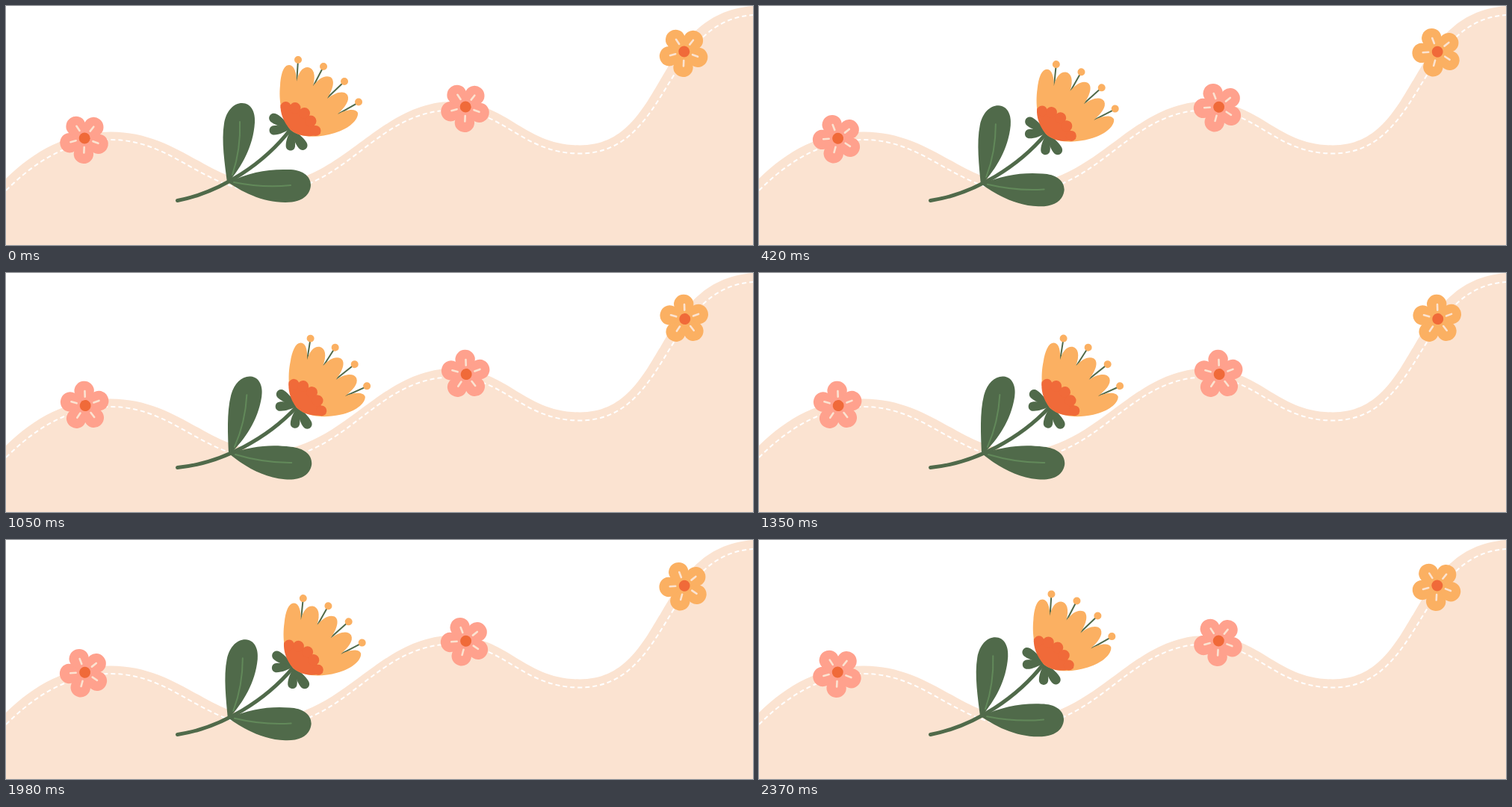
Recreate the animation shown at these times as an HTML page. Size 1000 by 320 pixels, loop 2.4 s.

```html
<!DOCTYPE html>
<html lang="en">
<head>
<meta charset="utf-8">
<title>Swaying flowers</title>
<style>
html, body { margin: 0; width: 100%; height: 100%; overflow: hidden; background: #fff; }
svg { display: block; width: 100%; height: 100%; }
.line { fill: none; stroke-linecap: round; }
</style>
</head>
<body>
<svg viewBox="0 0 1000 320">
  <defs>
    <ellipse id="petal" cy="20.5" rx="13.2" ry="12.7"/>
    <path id="vein" d="M0 12V19.5" class="line" stroke="#fbe3d1" stroke-width="2.6"/>
    <path id="sepal" d="M0 0C4 6 7 14 6.5 20C6 27 -6 27 -6.5 20C-7 14 -4 6 0 0Z"/>
  </defs>

  <path fill="#fbe3d1" d="M0 231C38 194 82 169 140 168.5C231 168.5 273 238 350 238C449 238 499 128 598 128C671 128 693 186.5 768 186.5C885 186.5 865 10 1000 0V320H0Z"/>
  <path fill="none" stroke="#fff" stroke-width="2" stroke-dasharray="6 4" d="M0 247C40 207 85 180 140 179C225 179 265 249 350 249C455 249 495 139 598 139.5C668 140 690 197 768 197.5C890 197.5 880 20 1000 12"/>

  <g id="bloom">
    <g fill="#506a4a">
      <use href="#sepal" transform="translate(381 164) rotate(122) scale(1 1.3)"/>
      <use href="#sepal" transform="translate(381 164) rotate(84) scale(.95 1.13)"/>
      <use href="#sepal" transform="translate(382 165) rotate(3) scale(.95 1.13)"/>
      <use href="#sepal" transform="translate(382 165) rotate(-35) scale(1 1.3)"/>
      <path d="M296 236C293 212 288 181 292 157C295 140 305 130 316 130C328 130 334 142 333 156C331 188 316 214 298 236Z"/>
      <path d="M297 236C325 223 350 218 378 219C396 219 408 227 408 240C407 255 394 263 374 263C344 263 318 250 297 236Z"/>
    </g>
    <path class="line" stroke="#62895a" stroke-width="2" d="M303 226C310 205 314 180 313 155M305 236C330 241 352 243 381 240"/>
    <path class="line" stroke="#506a4a" stroke-width="5" d="M229.500 260.500C290 249 347 209 381 165"/>
    <path class="line" stroke="#506a4a" stroke-width="2" d="M391 72L389 104M425 81L410 110M453 101L428 125M472 129L442 146"/>
    <g fill="#fbb062">
      <circle cx="391" cy="72" r="5"/>
      <circle cx="425" cy="81" r="5"/>
      <circle cx="453" cy="101" r="5"/>
      <circle cx="472" cy="128.500" r="5"/>
      <path d="M381 166C368 150 365 125 367 106C368 90 372 79 379 79C386 79 389 90 389 101C391 90 396 82 404 82C412 83 415 92 411 107C418 98 426 92 434 95C441 99 438 111 430 124C440 116 452 112 457 119C461 127 453 136 444 145C454 139 468 136 471 143C472 152 460 164 440 170C418 177 395 177 381 166Z"/>
    </g>
    <g fill="#f06a39">
      <path d="M381 166C371 155 367 143 367.500 132L387 134L401 142L409 154L421 171C406 177 391 174 381 166Z"/>
      <circle cx="374.500" cy="135" r="7"/>
      <circle cx="387" cy="136.500" r="7.500"/>
      <circle cx="399.500" cy="143.500" r="7.500"/>
      <circle cx="408" cy="154" r="7.500"/>
      <circle cx="414.500" cy="167" r="7"/>
    </g>
  </g>
  <g id="daisies"></g>
</svg>
<script>
const LOOP = 2400;
const bloom = document.getElementById('bloom');
const daisies = document.getElementById('daisies');

const ring = id => [0, 72, 144, 216, 288]
  .map(a => `<use href="#${id}" transform="rotate(${a})"/>`).join('');

const daisy = (x, y, color) => `<g><g transform="translate(${x} ${y}) rotate(2.4)">
  <g fill="${color}" transform="translate(-.4 .8)"><circle r="18"/>${ring('petal')}</g>
  ${ring('vein')}<circle r="7.500" fill="#f06a39"/></g></g>`;

const spots = [[105.2, 177, '#ffa18d'], [615.2, 135, '#ffa18d'], [907.8, 61, '#fbb062']];
daisies.innerHTML = spots.map(s => daisy(...s)).join('');

// Everything turns linearly clockwise for half the loop, then back.
function draw(now) {
  const t = now % LOOP / LOOP;
  const swing = 1 - Math.abs(1 - 2 * t);
  bloom.setAttribute('transform', `rotate(${6 * swing} 229 261)`);
  spots.forEach(([x, y], i) => daisies.children[i].setAttribute(
    'transform', `rotate(${36 * swing} ${x - 0.6} ${y + 2})`));
}

const start = performance.now();
function tick() {
  draw(performance.now() - start);
  requestAnimationFrame(tick);
}
tick();
</script>
</body>
</html>
```
